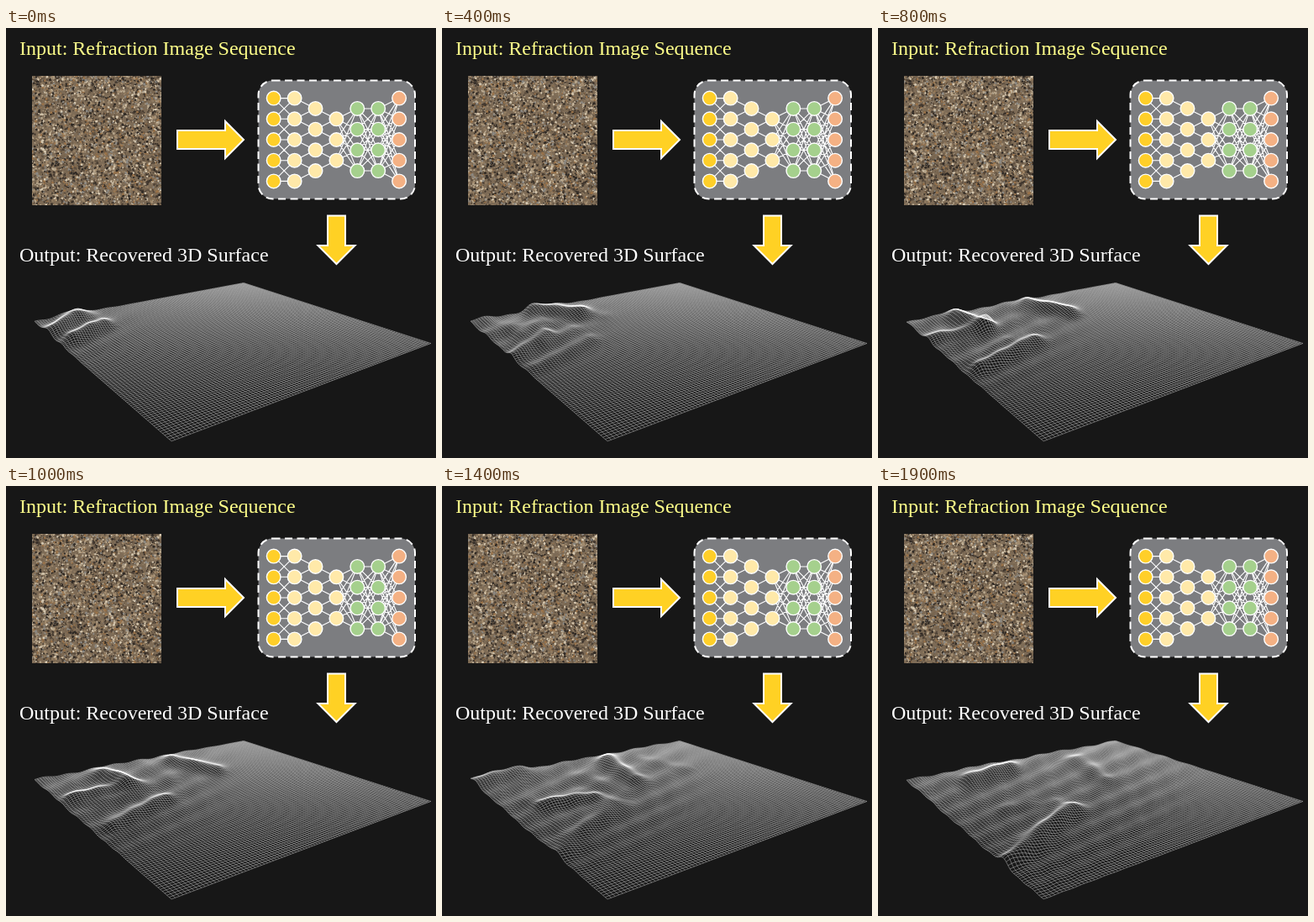
Recreate the animation shown at these times as an HTML page with a canvas. Size 512 px wide and 512 px high, loop 2 s.

```html
<!DOCTYPE html>
<html lang="en">
<head>
<meta charset="utf-8">
<title>Surface from refraction</title>
<style>
  html, body { margin: 0; width: 100%; height: 100%; overflow: hidden; background: #171717; }
  canvas { display: block; width: 512px; height: 512px; }
</style>
</head>
<body>
<canvas id="stage" width="512" height="512"></canvas>
<script>
const ctx = document.getElementById("stage").getContext("2d");
const LOOP = 2000, STEP = 100, CELLS = 100;

function seeded(seed) {
  return () => {
    seed = (seed + 0x6D2B79F5) | 0;
    let x = Math.imul(seed ^ (seed >>> 15), 1 | seed);
    x = (x + Math.imul(x ^ (x >>> 7), 61 | x)) ^ x;
    return ((x ^ (x >>> 14)) >>> 0) / 4294967296;
  };
}

function polygon(c, points) {
  c.beginPath();
  points.forEach(([x, y]) => c.lineTo(x, y));
  c.closePath();
}

// Static parts: labels, arrows and network

function label(c, text, y, color) {
  c.font = '24px "Liberation Serif", "Times New Roman", serif';
  c.fillStyle = color;
  c.fillText(text, 16, y);
}

// Arrow ending at (x, y), pointing right before the turn
function arrow(c, x, y, length, half, turn) {
  const head = 22;
  c.save();
  c.translate(x, y);
  c.rotate(turn);
  polygon(c, [[-length, -half], [-head, -half], [-head, -head], [0, 0],
              [-head, head], [-head, half], [-length, half]]);
  c.fillStyle = "#ffd124";
  c.strokeStyle = "#fff";
  c.lineWidth = 2;
  c.fill();
  c.stroke();
  c.restore();
}

const near = (i, j) => Math.abs(i - j) < 2;
const merge = (i, j) => i === j || i === j + 1;
const full = () => true;
const yellow = "#ffcf29", cream = "#ffe9a9", green = "#a5d08d", orange = "#f4b184";
const layers = [
  { n: 5, color: yellow },
  { n: 5, color: cream, links: near },
  { n: 4, color: cream, links: merge },
  { n: 3, color: cream, links: merge },
  { n: 4, color: green, links: full },
  { n: 4, color: green, links: full },
  { n: 5, color: orange, links: full }
];
layers.forEach((layer, k) => { layer.x = 318.7 + 24.9 * k; });
const nodeY = (layer, i) => 133 + (i - (layer.n - 1) / 2) * 24.7;

function network(c) {
  c.beginPath();
  c.roundRect(300.5, 62.5, 186.5, 141, 17);
  c.fillStyle = "#7c7d80";
  c.fill();
  c.strokeStyle = "#fff";
  c.lineWidth = 2;
  c.setLineDash([9, 5.5]);
  c.stroke();
  c.setLineDash([]);

  c.lineWidth = 1.1;
  c.beginPath();
  layers.slice(1).forEach((to, k) => {
    const from = layers[k];
    for (let i = 0; i < from.n; i++)
      for (let j = 0; j < to.n; j++)
        if (to.links(i, j)) {
          c.moveTo(from.x, nodeY(from, i));
          c.lineTo(to.x, nodeY(to, j));
        }
  });
  c.stroke();

  c.lineWidth = 1.4;
  for (const layer of layers)
    for (let i = 0; i < layer.n; i++) {
      c.beginPath();
      c.arc(layer.x, nodeY(layer, i), 8.3, 0, 2 * Math.PI);
      c.fillStyle = layer.color;
      c.fill();
      c.stroke();
    }
}

function buildBackdrop() {
  const sheet = document.createElement("canvas");
  sheet.width = sheet.height = 512;
  const c = sheet.getContext("2d");
  c.fillStyle = "#171717";
  c.fillRect(0, 0, 512, 512);
  label(c, "Input: Refraction Image Sequence", 32, "#ffff8a");
  label(c, "Output: Recovered 3D Surface", 278, "#fff");
  arrow(c, 283, 133, 79, 11, 0);
  arrow(c, 393.5, 281, 57.5, 10.5, Math.PI / 2);
  network(c);
  return sheet;
}

// Sand seen through moving water

const tones = ["#2f2924", "#463b31", "#5f5040", "#786650", "#8f7a60",
               "#a48d70", "#b7a68c", "#d6c8b0", "#8c8983", "#9a734a"];
const rand = seeded(41);
const grains = Array.from({ length: 6500 }, () => {
  const x = 28 + rand() * 160, y = 54 + rand() * 160;
  const shade = Math.sin(x / 17 + y / 29) + Math.sin(y / 13 - x / 31);
  const dark = rand() < 0.12 - shade * 0.06;
  return {
    x, y, size: 0.6 + rand() * 1.3, turn: rand() * Math.PI,
    color: tones[Math.floor(rand() * (dark ? 3 : tones.length))]
  };
});

function sand(t) {
  ctx.save();
  ctx.beginPath();
  ctx.rect(31, 57, 154, 154);
  ctx.clip();
  ctx.fillStyle = "#7d6b56";
  ctx.fillRect(31, 57, 154, 154);
  for (const g of grains) {
    const x = g.x + 1.2 * Math.sin(g.y / 23 + g.x / 40 - t * 5);
    const y = g.y + 1.2 * Math.sin(g.x / 19 - g.y / 37 - t * 4);
    const a = Math.cos(g.turn) * g.size, b = Math.sin(g.turn) * g.size;
    polygon(ctx, [[x + a * 1.3, y + b * 1.3], [x - b, y + a], [x - a, y - b], [x + b, y - a]]);
    ctx.fillStyle = g.color;
    ctx.fill();
  }
  ctx.restore();
}

// Perspective sheet spanned by its left, top, right and bottom corners

function perspective([x0, y0], [x1, y1], [x2, y2], [x3, y3]) {
  const ax = x1 - x2, ay = y1 - y2, bx = x3 - x2, by = y3 - y2;
  const sx = x0 - x1 + x2 - x3, sy = y0 - y1 + y2 - y3;
  const det = ax * by - bx * ay;
  const g = (sx * by - bx * sy) / det, h = (ax * sy - sx * ay) / det;
  return (u, v) => {
    const w = 1 + g * u + h * v;
    return [
      (x0 + (x1 - x0 + g * x1) * u + (x3 - x0 + h * x3) * v) / w,
      (y0 + (y1 - y0 + g * y1) * u + (y3 - y0 + h * y3) * v) / w
    ];
  };
}

const origin = [34, 350];
const project = perspective(origin, [283, 303.5], [506, 375.5], [197, 492]);
const ground = [];
for (let i = 0; i <= CELLS; i++)
  for (let j = 0; j <= CELLS; j++) ground.push(project(i / CELLS, j / CELLS));

// Ridges run away from the left corner: peak time, segment ends, speed, height
const ridges = [
  [0, 60, 362, 84, 348, 90, 10],
  [0, 82, 372, 116, 354, 100, 7],
  [0.4, 85, 391, 125, 366, 70, 6],
  [0.4, 108, 337, 165, 341, 150, 8],
  [0.9, 105, 346, 138, 358, 125, 11],
  [0.9, 188, 328, 240, 340, 100, 6],
  [0.8, 122, 406, 185, 373, 25, 8],
  [0.9, 72, 372, 135, 360, 60, 7],
  [1.55, 208, 328, 240, 350, 80, 9],
  [1.75, 150, 446, 222, 385, 50, 12],
  [1.7, 85, 352, 130, 339, 120, 11],
  [1.4, 120, 381, 180, 372, 60, 7]
];

function activeRidges(t) {
  return ridges.map(([peak, ax, ay, bx, by, speed, height]) => {
    const age = t - peak, dx = bx - ax, dy = 2 * (by - ay);
    const slope = 0.6 * ((ay + by) / 2 - origin[1]) / ((ax + bx) / 2 - origin[0]);
    const width = 4 + height / 2;
    return {
      x: ax + speed * age, y: 2 * (ay + speed * slope * age),
      dx, dy, len2: dx * dx + dy * dy,
      spread: 2 * width * width, height: height * Math.exp(-((age / 0.4) ** 2))
    };
  }).filter(r => r.height > 0.15);
}

function lift(x, groundY, t, active) {
  const y = 2 * groundY;
  let sum = 0;
  for (const r of active) {
    const px = x - r.x, py = y - r.y;
    const k = Math.max(0, Math.min(1, (px * r.dx + py * r.dy) / r.len2));
    const d2 = (px - k * r.dx) ** 2 + (py - k * r.dy) ** 2;
    if (d2 < 5 * r.spread) sum += r.height * Math.exp(-d2 / r.spread);
  }
  const far = Math.hypot(x - origin[0], y - 2 * origin[1]);
  const reach = 1 / (1 + Math.exp((far - 90 - 120 * t) / 16));
  const ripple = Math.sin(x / 6 + y / 19 - t * 14) * Math.sin(y / 11 - x / 23 - t * 6);
  return sum + 1.3 * reach * ripple;
}

function surface(t) {
  const active = activeRidges(t);
  const points = ground.map(([x, y]) => [x, y - lift(x, y, t, active)]);
  const at = (i, j) => points[i * (CELLS + 1) + j];
  ctx.lineWidth = 1;
  ctx.lineJoin = "round";
  ctx.strokeStyle = "rgba(255,255,255,0.35)";
  const strand = pick => {
    ctx.beginPath();
    for (let k = 0; k <= CELLS; k++) ctx.lineTo(...pick(k));
    ctx.stroke();
  };
  for (let n = 0; n <= CELLS; n++) {
    strand(k => at(n, k));
    strand(k => at(k, n));
  }
}

const backdrop = buildBackdrop();
const start = performance.now();
let shown = -1;

function render(now) {
  const step = Math.floor((Math.max(0, now - start) % LOOP) / STEP);
  if (step !== shown) {
    shown = step;
    const t = step * STEP / 1000;
    ctx.drawImage(backdrop, 0, 0);
    sand(t);
    surface(t);
  }
  requestAnimationFrame(render);
}
render(start);
</script>
</body>
</html>
```
